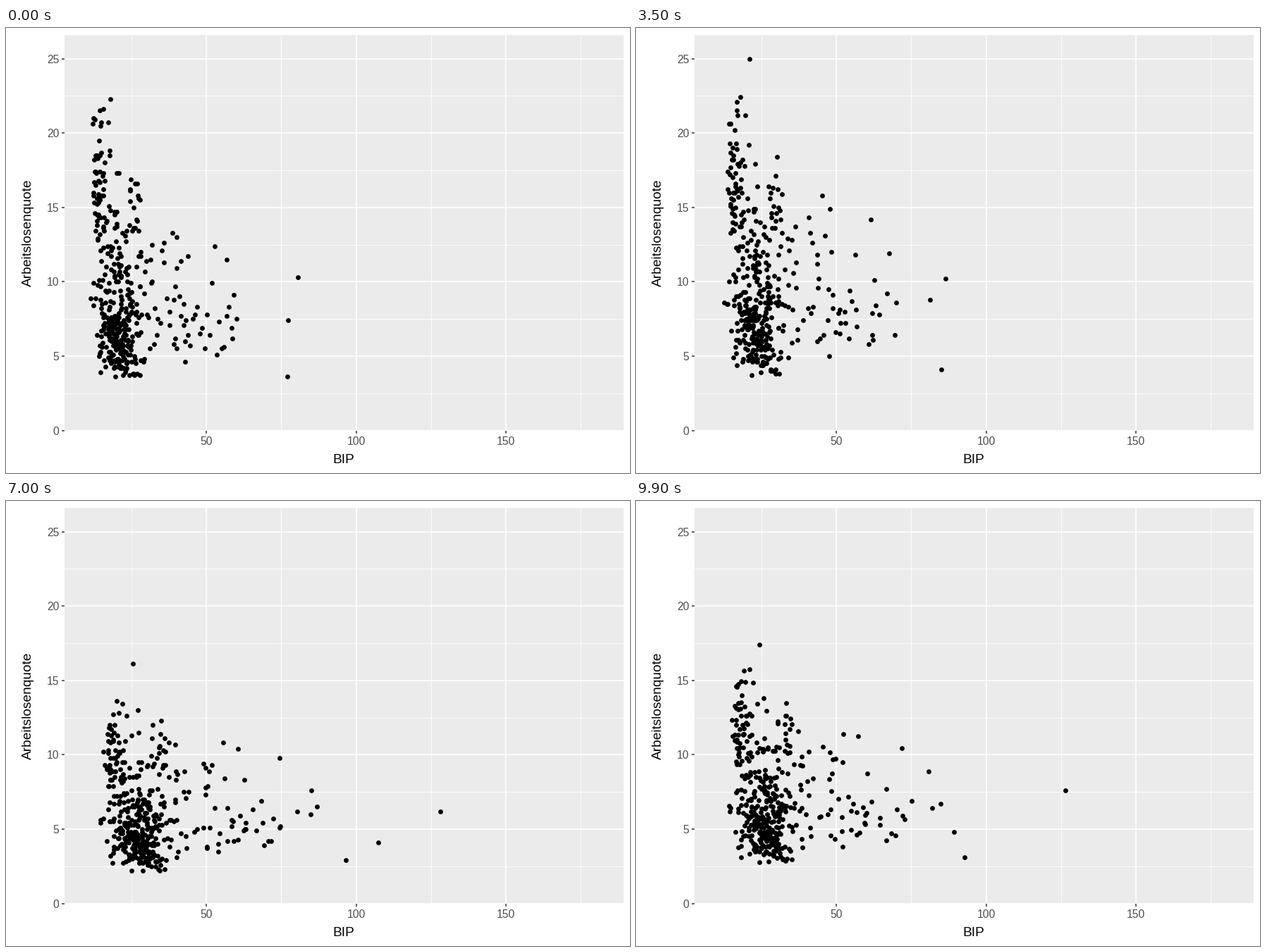
Write a matplotlib script that moves like this. It is 885 by 632 pixels and loops after 10 s.

```python
import numpy as np
import matplotlib.pyplot as plt
from matplotlib.animation import FuncAnimation
from matplotlib.patches import Rectangle

W, H, DPI = 885, 632, 120
FRAMES, STEP = 100, 100
LEFT, TOP, RIGHT, BOTTOM = 83, 9.5, 875.5, 571.5
YEARS = np.arange(18)

plt.rcParams["font.family"] = ["Liberation Sans", "DejaVu Sans"]
rng = np.random.default_rng(11)


def px(x):
    return 71.5 + 4.25 * x


def py(y):
    return BOTTOM - 21.12 * y


# --- yearly trends: output grows, unemployment peaks in year 4, then falls --
PROGRESS = (YEARS / 17) ** 1.2


def trend(peak, after, trough, late, last):
    return np.interp(YEARS, [0, 4, 6, 8, 12, 17],
                     [1, peak, after, trough, late, last])


EAST = trend(1.11, 1.02, .78, .60, .43)
WEST = trend(1.18, 1.08, .74, .67, .60)
CITY = trend(1.14, 1.12, .86, .77, .68)


def tracks(x0, y0, x1, y1, curve):
    """Yearly positions from first to last value, shaped by the trends."""
    x0, y0, x1, y1 = (np.atleast_1d(v).astype(float)
                      for v in (x0, y0, x1, y1))
    x = x0 * (x1 / x0) ** PROGRESS[:, None]
    drift = (y1 / (y0 * curve[-1])) ** (YEARS[:, None] / 17)
    return np.stack([x, y0 * curve[:, None] * drift], axis=2)


def cloud(x0, y0, curve, growth=1.54, spread=.07, wobble=.02):
    n = len(x0)
    x1 = x0 * growth * np.exp(rng.normal(0, spread, n))
    y1 = y0 * curve[-1] * np.exp(rng.normal(0, 4 * wobble, n))
    pos = tracks(x0, y0, x1, y1, curve)
    pos[1:] *= np.exp(rng.normal(0, wobble, (17, n, 2)) * [.5, 1])
    return pos


def lognorm(median, sigma, n, low, high):
    return np.clip(median * np.exp(rng.normal(0, sigma, n)), low, high)


def hub(times, xs, y0, y1):
    """One strong district whose output jumps between a few key years."""
    pos = tracks(xs[0], y0, xs[-1], y1, CITY)
    pos[:, 0, 0] = np.interp(YEARS, times, xs)
    return pos


def make_states():
    uni = rng.uniform
    west = cloud(lognorm(19.7, .15, 160, 14.5, 28),
                 lognorm(6.5, .28, 160, 3.6, 11), WEST)
    south = cloud(lognorm(24.5, .13, 50, 20, 33),
                  lognorm(5.3, .26, 50, 3.7, 9.5), WEST)
    suburbs = cloud(uni(30, 44, 16), uni(5.3, 8.5, 16), WEST)
    east = cloud(np.clip(11.9 + rng.gamma(2.6, 1.1, 64), 12, 19.5),
                 12.8 + 9.7 * rng.beta(1, 1.5, 64), EAST, 1.6, wobble=.012)
    middle = cloud(uni(14, 24, 34), uni(9.3, 12.8, 34), EAST)
    rural = cloud(uni(11.2, 15, 12), uni(5, 10, 12), EAST ** .8, 1.45)
    x = uni(17, 28, 24)
    towns = cloud(x, 13 + uni(0, 1, 24) * (12.5 - .33 * x), EAST ** .75)
    x = 24 + 20 * rng.beta(1, 1.6, 38)
    cities = cloud(x, uni(8, 14.5, 38) - .08 * (x - 24), CITY)
    rich = cloud(np.linspace(43, 60, 22), lognorm(7.4, .24, 22, 4.5, 13),
                 CITY, 1.5, .09, .015)
    states = np.concatenate([
        west, south, suburbs, east, middle, rural, towns, cities, rich,
        tracks(77.2, 7.4, 92.4, 6.0, CITY),
        tracks(77, 3.6, 108.8, 2.6, CITY),
        tracks(56.8, 11.5, 104.8, 6.3, CITY),
        tracks(18, 22.3, 30.6, 12.5, EAST),
        hub([0, 1, 4, 6, 9, 12, 14, 15, 16, 17],
            [80.5, 87.5, 74, 86.5, 90, 128, 136.5, 114.7, 180.5, 172.3],
            10.3, 4.9),
        hub([0, 8, 12, 16, 17], [58.7, 73, 107.5, 132.4, 120], 6.2, 3.4),
    ], axis=1)
    states[..., 1] = np.minimum(np.round(states[..., 1], 1), 25.4)
    return np.concatenate([states, states[:1]])


states = make_states()

# --- timing: hold each year, then glide linearly to the next --------------
clock_t, clock_v, now = [0], [0], 0
for k in YEARS:
    hold, glide = (2 if k == 0 else 3, 3) if k < 11 else (3, 2)
    clock_t += [now + hold, now + hold + glide]
    clock_v += [k, k + 1]
    now += hold + glide


def positions(frame):
    u = np.interp(frame, clock_t, clock_v)
    k = min(int(u), 17)
    a = u - k
    pos = (1 - a) * states[k] + a * states[k + 1]
    return px(pos[:, 0]), py(pos[:, 1])


# --- stage, in pixel coordinates ------------------------------------------
fig = plt.figure(figsize=(W / DPI, H / DPI), dpi=DPI, facecolor="white")
ax = fig.add_axes([0, 0, 1, 1])
ax.set_xlim(0, W)
ax.set_ylim(H, 0)
ax.axis("off")

panel = Rectangle((LEFT, TOP), RIGHT - LEFT, BOTTOM - TOP,
                  facecolor="#EBEBEB", edgecolor="none", zorder=0)
ax.add_patch(panel)


def line(xs, ys, width, color="white", z=1, clip=True):
    art, = ax.plot(xs, ys, color=color, lw=width * 72 / DPI, zorder=z,
                   solid_capstyle="butt")
    if clip:
        art.set_clip_path(panel)


def label(x, y, text, color="black", size=11.5, **kw):
    ax.text(x, y, text, color=color, size=size,
            **{"ha": "center", "va": "baseline", **kw})


MINOR, MAJOR = .9, 1.7
TICK, GREY = "#333333", "#4D4D4D"

for x in range(25, 176, 50):
    line([px(x)] * 2, [TOP, BOTTOM], MINOR)
for y in np.arange(2.5, 25, 5):
    line([LEFT, RIGHT], [py(y)] * 2, MINOR)
for x in range(50, 151, 50):
    line([px(x)] * 2, [TOP, BOTTOM], MAJOR, z=2)
    line([px(x)] * 2, [BOTTOM, BOTTOM + 4], 1.5, TICK, clip=False)
    label(px(x), 592.5, str(x), GREY, 9.4)
for y in range(0, 26, 5):
    line([LEFT, RIGHT], [py(y)] * 2, MAJOR, z=2)
    line([LEFT - 4, LEFT], [py(y)] * 2, 1.5, TICK, clip=False)
    label(75.5, py(y) + 6, str(y), GREY, 9.4, ha="right")
label(478.5, 618, "BIP")
label(31, 290.5, "Arbeitslosenquote", rotation=90, va="center")

dots, = ax.plot([], [], "o", color="black", ms=4.1, mew=0, zorder=3)


def draw(frame):
    dots.set_data(*positions(frame))
    return dots,


anim = FuncAnimation(fig, draw, frames=FRAMES, interval=STEP, repeat=True,
                     repeat_delay=0, init_func=lambda: draw(0), blit=False)
plt.show()
```
